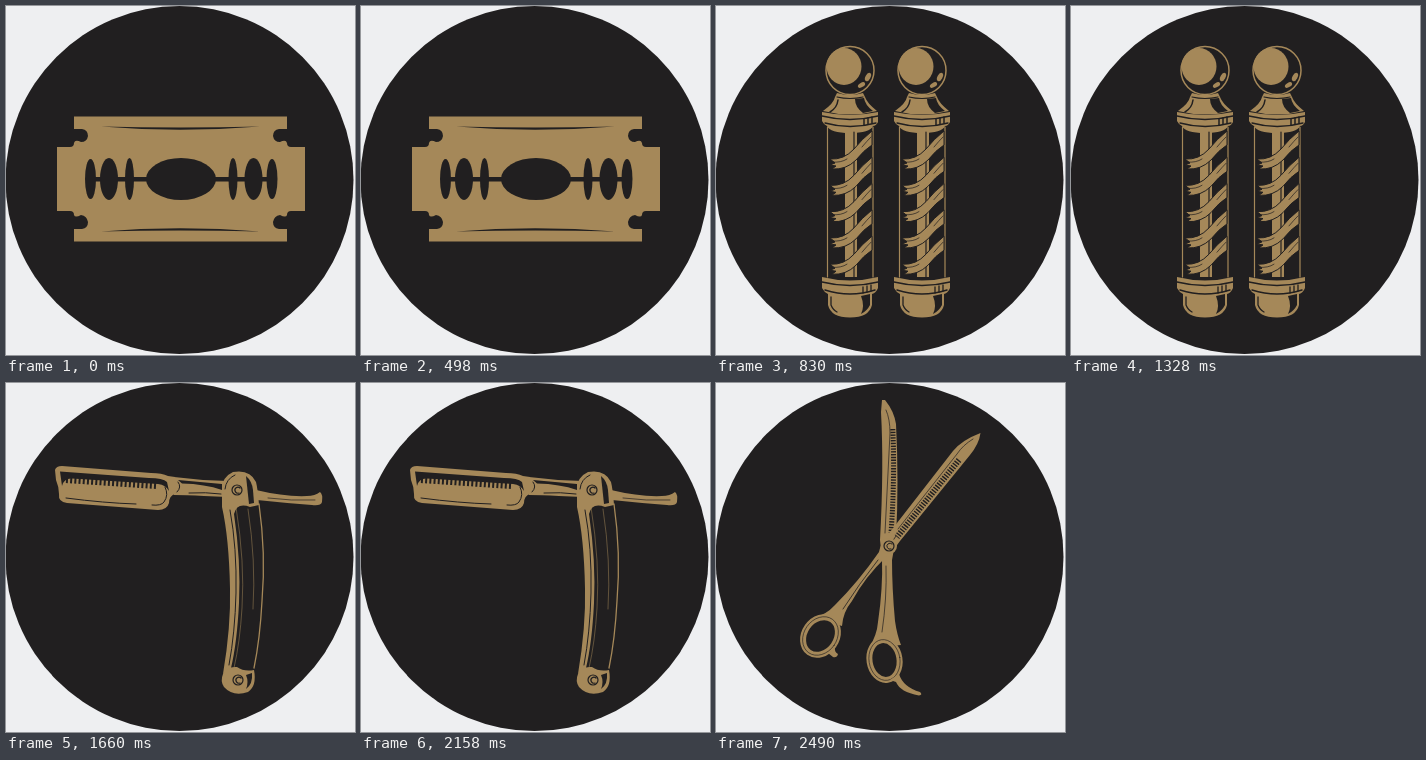
These frames come from a looping animation (349 by 349 pixels, 3.32 s). An HTML page:

```html
<!DOCTYPE html>
<html lang="en">
<head>
<meta charset="utf-8">
<title>Barber tools</title>
<style>
  html, body { margin: 0; width: 100%; height: 100%; overflow: hidden; background: #eeeff1; }
  svg { display: block; width: 100%; height: 100%; }
  .art { filter: blur(.45px); }
  .scene { visibility: hidden; animation: show 3320ms step-end infinite; animation-delay: calc((var(--i) - 4) * 830ms); }
  @keyframes show {
    0% { visibility: visible; }
    25%, 100% { visibility: hidden; }
  }
  .g { fill: #a58859; }
  .d { fill: #211f20; }
  .gl { fill: none; stroke: #a58859; stroke-linecap: round; }
  .dl { fill: none; stroke: #211f20; stroke-linecap: round; }
  .comb { stroke-linecap: butt; }
</style>
</head>
<body>
<svg viewBox="0 0 349 349">
  <defs>
    <g id="slots" class="d">
      <ellipse cx="84.500" cy="173" rx="5.500" ry="20"/>
      <ellipse cx="103" cy="173" rx="9" ry="21"/>
      <ellipse cx="123.500" cy="173" rx="4.500" ry="21"/>
    </g>
    <g id="pole">
      <circle class="gl" cx="134" cy="64.500" r="24" stroke-width="1.500"/>
      <ellipse class="g" cx="128" cy="60.500" rx="17.500" ry="18.500"/>
      <ellipse class="g" cx="152" cy="71" rx="2.500" ry="4.500" transform="rotate(28 152 71)"/>
      <ellipse class="g" cx="145.500" cy="79" rx="2.200" ry="4" transform="rotate(58 145.500 79)"/>
      <path class="g" d="M121 87Q134 91 147 87L149 91Q151 97 161 105Q134 112 107 105Q118 97 119 91Z"/>
      <path class="dl" d="M121 91Q134 94 147 91" stroke-width="1.200"/>
      <path class="d" d="M139 93L148 92Q149 99 157 105L147 107Q139 101 139 93Z"/>
      <path class="dl" d="M122 94Q121 102 114 106" stroke-width="1.500"/>
      <path class="g" d="M106 106Q134 112 162 106V116Q160 120 157 120Q154 127 134 127Q114 127 111 120Q108 119 106 115Z"/>
      <path class="dl" d="M106 110Q134 117 162 110M109 117Q134 124 160 117" stroke-width="1.300"/>
      <path class="dl" d="M148 113V119M152 112V118M156 111V117" stroke-width="1.500"/>
      <path class="gl" d="M111.500 121V271M157 121V271" stroke-width="1.200"/>
      <path class="g" d="M129 126H141V271H129Z"/>
      <path class="dl" d="M138 126V271" stroke-width="1.200"/>
      <g id="stripes"></g>
      <path class="g" d="M106 271Q134 278 162 271V282Q160 287 156 288V299Q153 311.500 134 311.500Q115 311.500 112 299V288Q108 286 106 282Z"/>
      <path class="dl" d="M106 276Q134 283 162 276M109 284Q134 292 159 284" stroke-width="1.500"/>
      <path class="d" d="M145 290L154 288V299Q151 305 145 308Q149 300 145 290Z"/>
      <path class="dl" d="M115 291V299Q117 304 121 306M147 281V287M151 280V286M155 279V285" stroke-width="1.300"/>
    </g>
  </defs>

  <g class="art">
  <circle class="d" cx="173.500" cy="174" r="174"/>

  <!-- razor blade -->
  <g class="scene" style="--i:0">
    <path class="g" d="M68 110.500H281V123H273Q267 124 267 130Q268 136 274 136Q280 133 281 137Q281 141 285 141H299V205H285Q281 205 281 209Q280 212 274 209Q268 210 267 216Q267 222 273 223H281V235.500H68V223H76Q82 222 82 216Q81 210 75 209Q69 212 68 209Q68 205 64 205H51V141H64Q68 141 68 137Q69 133 75 136Q81 136 82 130Q82 124 76 123H68Z"/>
    <path class="d" d="M95 120.500Q174 122.500 254 120.500Q174 127 95 120.500ZM95 225.500Q174 223.500 254 225.500Q174 219 95 225.500ZM80 171H270V175.500H80Z"/>
    <ellipse class="d" cx="175" cy="173" rx="35" ry="21"/>
    <use href="#slots"/>
    <use href="#slots" transform="matrix(-1 0 0 1 350.500 0)"/>
  </g>

  <!-- barber poles -->
  <g class="scene" style="--i:1">
    <use href="#pole"/>
    <use href="#pole" x="72"/>
  </g>

  <!-- straight razor -->
  <g class="scene" style="--i:2">
    <path class="g" d="M49 87Q50 83 56 83L145 90Q156 90 162 93L169 94V111Q163 113 163 120Q161 127 152 127L61 120Q52 119 53 111Q53 104 50 97Z"/>
    <path class="d" d="M54 88.500L143 95Q157 95 161 99L163 108Q160 102 152 101L66 95.500Q58 95 56 103Z"/>
    <path class="dl comb" d="M60 97L150 103" stroke-width="6" stroke-dasharray="2 2.200"/>
    <path class="dl" d="M159 104Q163 112 158 119Q155 123 146 122M60 115Q98 120 130 121" stroke-width="1"/>
    <path class="g" d="M168 94L197 97L222 98V114L198 113Q180 112 168 112Z"/>
    <path class="d" d="M172 97L216 101V107Q199 101 176 100.500Z"/>
    <path class="dl" d="M172 99Q176 104 171 109M183 110Q200 109 215 111" stroke-width="1"/>
    <path class="g" d="M250 107Q279 114 301 113Q309 113 314 109Q317 111 316 119Q315 123 306 122Q279 120 251 117Z"/>
    <path class="dl" d="M262 115Q285 118 309 117" stroke-width=".7"/>
    <path class="g" d="M216 106Q216 94 227 89Q244 86 250 99Q252 107 253 122L244 124Q231 119 228 131Q235 178 233 220Q231 260 225 285L217 291Q225 244 224 205Q223 155 216 124Z"/>
    <path class="d" d="M240 93Q246 98 247 107L248 120L243 121Z"/>
    <path class="dl" d="M219 106Q220 96 229 92M224 127Q231 165 230 210Q229 250 223 282" stroke-width="1"/>
    <path class="gl" d="M253 121Q260 170 256 218Q254 256 248 285" stroke-width="1.300"/>
    <path class="gl" d="M230 124Q239 180 236 225Q234 259 228 285M242 126Q250 178 247 226" stroke-width=".5"/>
    <path class="g" d="M217 291Q221 283 231 284Q238 289 248 287Q251 303 242 309Q227 314 218 304Q214 298 217 291Z"/>
    <path class="d" d="M240 292L246 290Q247 301 240 306Q243 299 240 292Z"/>
    <g class="dl" stroke-width="1.200">
      <circle cx="231" cy="107" r="5"/><path d="M234 105A3 3 0 1 0 233 110"/>
      <circle cx="232" cy="297" r="5"/><path d="M235 295A3 3 0 1 0 234 300"/>
    </g>
  </g>

  <!-- scissors -->
  <g class="scene" style="--i:3">
    <path class="g" d="M166 17L169 17Q178 28 180 41Q183 100 180 155L176 177Q176 205 179 238Q181 252 185 262L153 265Q161 252 162 239Q167 205 166 176L164 157Q168 85 165 29Z"/>
    <path class="dl" d="M170 27Q174 36 174 50L169 150" stroke-width=".7"/>
    <path class="dl comb" d="M176.800 46Q179 96 175 150" stroke-width="5" stroke-dasharray="1.400 1.400"/>
    <path class="dl" d="M170 183Q171 216 166 249" stroke-width=".7"/>
    <path class="g" d="M264.500 50Q263 61 254 72L184 158Q177 168 170 174Q149 194 136 218Q127 229 126 243L97 235Q110 232 119 222Q143 198 163 169Q165 158 174 149L237 68Q246 57 264.500 50Z"/>
    <path class="dl" d="M257 56Q247 62 241 71L182 146" stroke-width=".7"/>
    <path class="dl comb" d="M243 77L181 154" stroke-width="6" stroke-dasharray="1.400 1.400"/>
    <path class="dl" d="M180 153L174 162M162 177Q143 201 127 226" stroke-width=".8"/>
    <circle class="g" cx="173" cy="163" r="8"/>
    <circle class="dl" cx="173" cy="163" r="5" stroke-width="1.200"/>
    <path class="dl" d="M176 161A3 3 0 1 0 175 166" stroke-width="1"/>
    <g fill="#211f20" stroke="#a58859" stroke-width="6">
      <ellipse cx="104.500" cy="253" rx="16" ry="20" transform="rotate(35 104.500 253)"/>
      <ellipse cx="168.500" cy="277" rx="15" ry="20" transform="rotate(-9 168.500 277)"/>
    </g>
    <g class="dl" stroke-width=".6">
      <ellipse cx="104.500" cy="253" rx="16.500" ry="20.500" transform="rotate(35 104.500 253)"/>
      <ellipse cx="168.500" cy="277" rx="15.500" ry="20.500" transform="rotate(-9 168.500 277)"/>
    </g>
    <path class="g" d="M112 270L119 264Q118 269 122 271Q121 275 117 274ZM174 297L183 291Q187 304 204 309Q207 312 203 312.500Q184 309 180 299Z"/>
  </g>
  </g>
</svg>
<script>
  // Spiral bands with feathered ends, evenly spaced down the glass.
  const band = y => `
    <path class="g" stroke="#211f20"
      d="M114 ${y}Q128 ${y + 1} 138 ${y - 10}Q146 ${y - 20} 156 ${y - 28}V${y - 14}Q148 ${y - 9} 140 ${y + 1}Q130 ${y + 11} 116 ${y + 10}L120 ${y + 7}L114 ${y + 6}L119 ${y + 4}Z"/>
    <path class="dl" stroke-width=".7"
      d="M116 ${y + 3}Q125 ${y + 4} 131 ${y}M155 ${y - 22}Q151 ${y - 18} 146 ${y - 12}"/>`;
  document.getElementById("stripes").innerHTML =
    Array.from({ length: 5 }, (_, i) => band(153 + i * 26.3)).join("");
</script>
</body>
</html>
```
